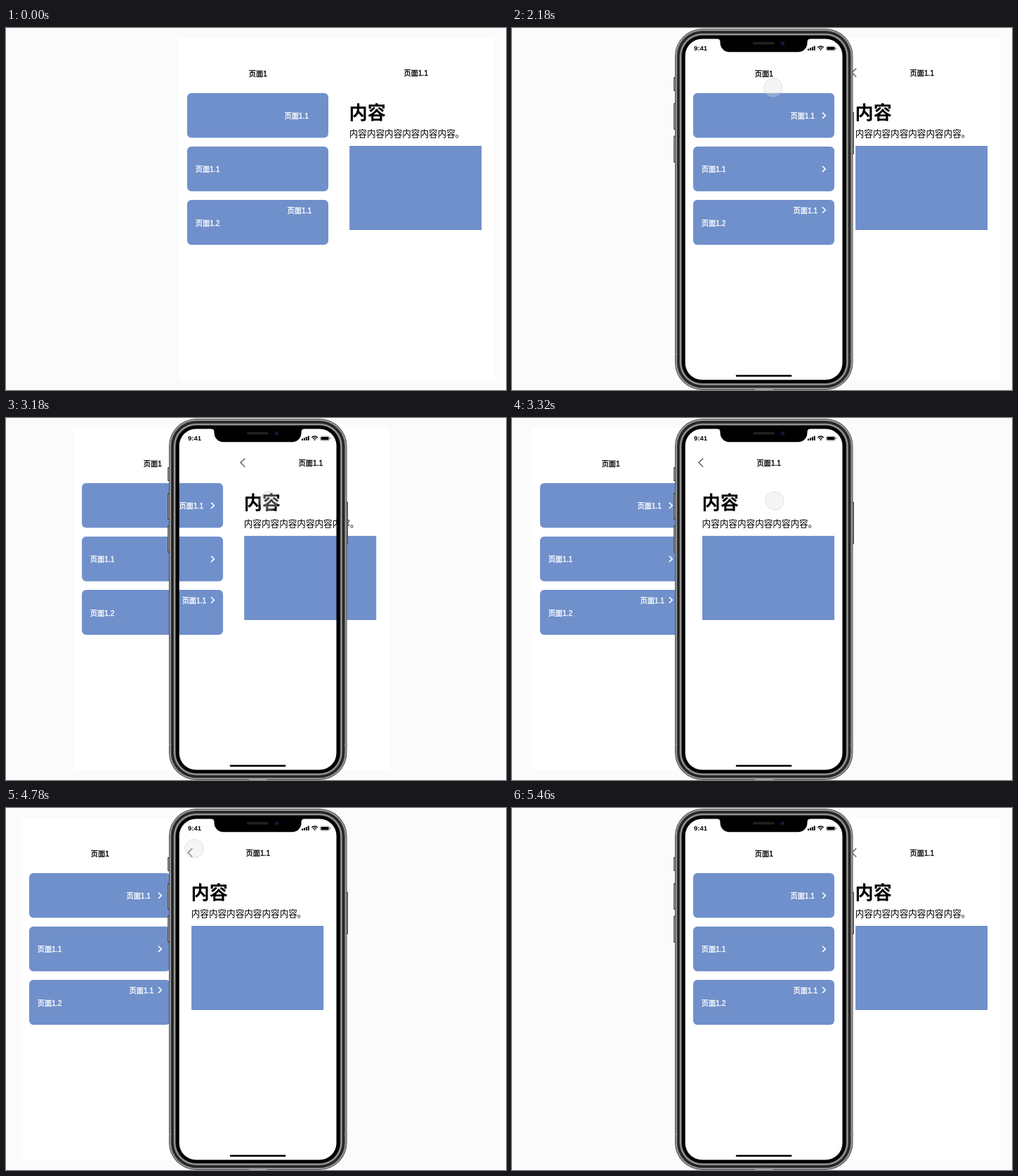
Write an HTML page with a canvas that moves like this. It is 712 px wide and 516 px high and loops after 6.58 s.

```html
<!DOCTYPE html>
<html lang="zh-CN">
<head>
<meta charset="utf-8">
<title>页面</title>
<style>
html, body { margin: 0; width: 100%; height: 100%; overflow: hidden; background: #fbfbfb; }
canvas { display: block; width: 712px; height: 516px; }
</style>
</head>
<body>
<canvas id="stage"></canvas>
<script>
const W = 712, H = 516, LOOP = 6580, STEP = 20;
const FADE_AT = 1860, OPEN_AT = 3040, BACK_AT = 4940, SLIDE_MS = 360, SLIDE = 225;
const BLUE = '#7090cb';
const FONT = '"Liberation Sans", "Noto Sans CJK SC", "Noto Sans CJK", sans-serif';
const dpr = window.devicePixelRatio || 1;

function setup(canvas) {
  canvas.width = W * dpr;
  canvas.height = H * dpr;
  const c = canvas.getContext('2d');
  c.scale(dpr, dpr);
  return c;
}

const ctx = setup(document.getElementById('stage'));
const phone = document.createElement('canvas');

const clamp = v => Math.min(1, Math.max(0, v));

// cubic-bezier(.25, .1, .25, 1), solved by bisection
function ease(x) {
  if (x <= 0 || x >= 1) return clamp(x);
  const curve = (s, a, b) => 3 * (1 - s) * (1 - s) * s * a + 3 * (1 - s) * s * s * b + s * s * s;
  let lo = 0, hi = 1;
  for (let i = 0; i < 24; i++) {
    const mid = (lo + hi) / 2;
    if (curve(mid, 0.25, 0.25) < x) lo = mid; else hi = mid;
  }
  return curve(lo, 0.1, 1);
}
const transition = (t, start) => ease((t - start) / SLIDE_MS);

function roundRect(c, x, y, w, h, r, color) {
  c.fillStyle = color;
  c.beginPath();
  c.roundRect(x, y, w, h, r);
  c.fill();
}

function line(c, points, color, width) {
  c.strokeStyle = color;
  c.lineWidth = width;
  c.beginPath();
  points.forEach(([x, y]) => c.lineTo(x, y));
  c.stroke();
}

// Medium text gets a hairline outline to carry its weight at small sizes
function label(c, text, x, y, size, color, weight = 500, align = 'left') {
  c.font = `${weight} ${size}px ${FONT}`;
  c.fillStyle = c.strokeStyle = color;
  c.textAlign = align;
  c.fillText(text, x, y);
  if (weight === 500) {
    c.lineWidth = 0.35;
    c.strokeText(text, x, y);
  }
}

function drawStatus(c) {
  label(c, '9:41', 259, 32.3, 9.5, '#000', 700);
  for (let i = 0; i < 4; i++) {
    const h = 2.4 + i * 1.35;
    roundRect(c, 421 + i * 2.9, 32 - h, 2, h, 0.5, '#000');
  }
  c.strokeStyle = '#000';
  c.lineWidth = 1.3;
  for (const r of [3.6, 6]) {
    c.beginPath();
    c.arc(439.5, 32, r, -Math.PI * 0.75, -Math.PI * 0.25);
    c.stroke();
  }
  c.fillStyle = '#000';
  c.beginPath();
  c.moveTo(439.5, 32.2);
  c.arc(439.5, 32.2, 2, -Math.PI * 0.75, -Math.PI * 0.25);
  c.fill();
  c.strokeStyle = '#777';
  c.lineWidth = 0.7;
  c.beginPath();
  c.roundRect(447.6, 26.1, 12.8, 6, 1.7);
  c.stroke();
  roundRect(c, 448.5, 27, 11, 4.2, 0.9, '#000');
  roundRect(c, 461.2, 28.1, 1, 2, 0.5, '#555');
}

function drawPhone(c) {
  for (const [x, y, h] of [[230.2, 70, 20], [230.2, 107, 38], [230.2, 153.5, 38.5], [484, 119.5, 60.5]]) {
    roundRect(c, x, y, 3, h, 1, '#3c3c3c');
    roundRect(c, x + 0.9, y + 1.5, 1.2, h - 3, 0.5, '#a0a0a0');
  }

  const rings = [
    [0, '#4a4a4a'], [1, '#a4a4a4'], [2.7, '#3c3c3c'], [4.2, '#1e1e1e'],
    [6.2, '#5c5c5c'], [7.4, '#a2a2a2'], [9, '#3a3a3a'], [10, '#000']
  ];
  for (const [d, color] of rings) {
    roundRect(c, 232 + d, 1 + d, 253.5 - 2 * d, 515 - 2 * d, 39 - d, color);
  }
  for (const x of [232, 481.5]) {
    c.fillStyle = '#858585';
    c.fillRect(x, 464.5, 4, 1.5);
  }
  roundRect(c, 346, 514.2, 26, 2, 1, '#a0a0a0');

  // Screen opening
  c.globalCompositeOperation = 'destination-out';
  roundRect(c, 246.7, 15.5, 223.8, 486, 24, '#000');
  c.globalCompositeOperation = 'source-over';

  // Sensor housing
  c.fillStyle = '#000';
  c.beginPath();
  c.moveTo(291.5, 15);
  c.quadraticCurveTo(296.5, 15.5, 296.5, 20);
  c.arcTo(296.5, 34.2, 310, 34.2, 13);
  c.arcTo(420.5, 34.2, 420.5, 20, 13);
  c.lineTo(420.5, 20);
  c.quadraticCurveTo(420.5, 15.5, 425.5, 15);
  c.fill();
  roundRect(c, 343, 20, 31, 3.4, 1.7, '#202020');
  roundRect(c, 382.2, 18.8, 6.4, 6.4, 3.2, '#0c0f20');
  roundRect(c, 383.8, 20.4, 3.2, 3.2, 1.6, '#18224c');

  drawStatus(c);
  roundRect(c, 318.7, 494.6, 79.8, 2.4, 1.2, '#000');
}

function drawPages(shift, alpha) {
  ctx.save();
  ctx.translate(-shift, 0);
  ctx.fillStyle = '#fff';
  ctx.fillRect(246, 14, 225, 488);
  ctx.fillRect(471, 14, 225, 488);

  label(ctx, '页面1', 358.8, 69, 10.2, '#000', 500, 'center');
  for (const y of [92.8, 168.9, 245.1]) roundRect(ctx, 258, y, 201, 63.8, 6, BLUE);
  label(ctx, '页面1.1', 396.5, 129, 10.2, '#fff');
  label(ctx, '页面1.1', 269.8, 205.2, 10.2, '#fff');
  label(ctx, '页面1.2', 269.8, 282.2, 10.2, '#fff');
  label(ctx, '页面1.1', 400.6, 264, 10.2, '#fff');

  label(ctx, '页面1.1', 583.8, 68, 10.2, '#000', 500, 'center');
  label(ctx, '内容', 488.6, 130, 26.2, '#000', 700);
  label(ctx, '内容内容内容内容内容内容。', 488.7, 154.9, 12.6, '#000', 400);
  ctx.fillStyle = BLUE;
  ctx.fillRect(489.1, 168, 188.1, 120);

  ctx.globalAlpha = alpha;
  for (const y of [124.8, 200.9, 259.5]) {
    line(ctx, [[442, y - 4.2], [446.3, y], [442, y + 4.2]], '#fff', 1.6);
  }
  line(ctx, [[490.3, 57.5], [484, 63.6], [490.3, 69.7]], '#666', 1.5);
  ctx.restore();
}

// Pointer path: time, x, y
const path = [
  [1880, 365, 3], [2100, 371, 72], [2480, 374, 115.5], [2600, 374, 118],
  [3680, 374, 118], [3980, 316, 89], [4340, 283, 58.4], [4640, 268, 57.8],
  [5280, 268, 57.8], [5460, 275, -14]
];

function slope(i, k) {
  return (path[i + 1][k] - path[i][k]) / (path[i + 1][0] - path[i][0]);
}

function tangent(i, k) {
  if (i === 0) return slope(0, k);
  if (i === path.length - 1) return slope(i - 1, k);
  const a = slope(i - 1, k), b = slope(i, k);
  return a * b <= 0 ? 0 : 2 * a * b / (a + b);
}

// Monotone cubic, so the pointer never overshoots a rest
function follow(t, k) {
  let i = 0;
  while (i < path.length - 2 && t >= path[i + 1][0]) i++;
  const [t0, t1] = [path[i][0], path[i + 1][0]];
  const span = t1 - t0, u = clamp((t - t0) / span), v = 1 - u;
  return path[i][k] * v * v * (1 + 2 * u) + path[i + 1][k] * u * u * (3 - 2 * u)
    + span * u * v * (tangent(i, k) * v - tangent(i + 1, k) * u);
}

function drawPointer(t) {
  if (t < path[0][0] || t >= path[path.length - 1][0]) return;
  ctx.beginPath();
  ctx.arc(follow(t, 1), follow(t, 2), 13.2, 0, Math.PI * 2);
  ctx.fillStyle = 'rgba(224, 224, 224, .32)';
  ctx.fill();
  ctx.strokeStyle = 'rgba(175, 175, 175, .4)';
  ctx.lineWidth = 0.8;
  ctx.stroke();
}

function draw(time) {
  const t = Math.floor(time / STEP) * STEP;
  const alpha = transition(t, FADE_AT);
  const shift = SLIDE * (transition(t, OPEN_AT) - transition(t, BACK_AT));
  ctx.fillStyle = '#fbfbfb';
  ctx.fillRect(0, 0, W, H);
  drawPages(shift, alpha);
  ctx.globalAlpha = alpha;
  ctx.drawImage(phone, 0, 0, W, H);
  ctx.globalAlpha = 1;
  drawPointer(t);
}

drawPhone(setup(phone));
const start = performance.now();
function tick() {
  draw((performance.now() - start) % LOOP);
  requestAnimationFrame(tick);
}
tick();
</script>
</body>
</html>
```
